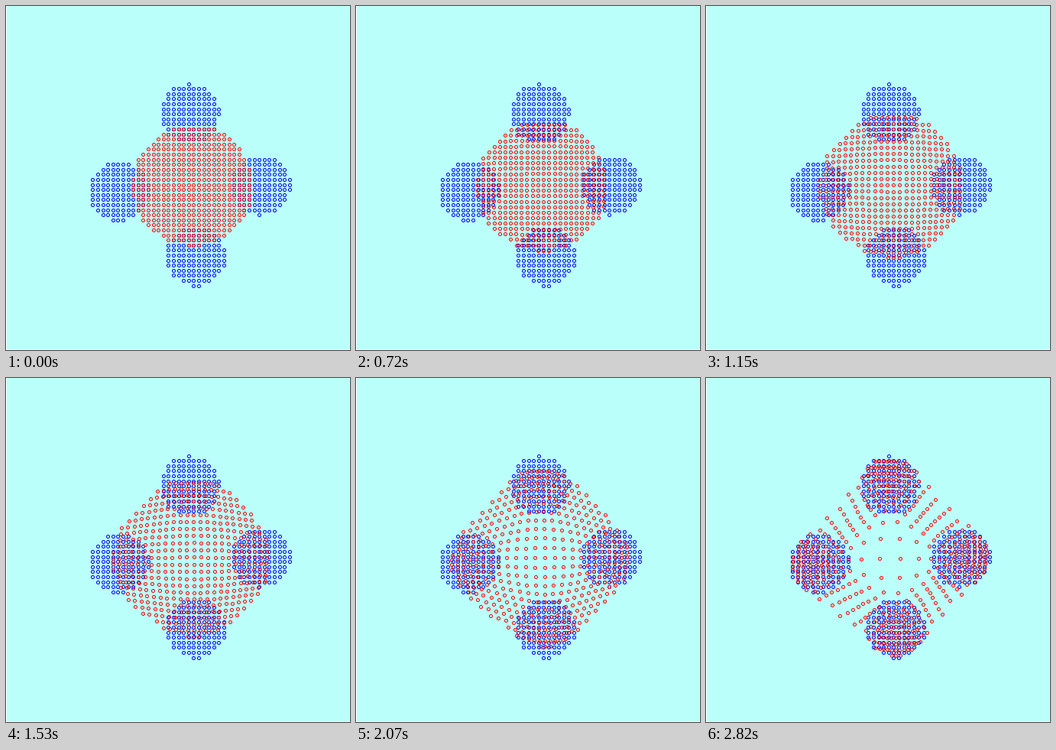
A matplotlib script that plays this animation: 450 px wide and 450 px high, repeating every 3.94 s.

```python
import numpy as np
import matplotlib.pyplot as plt
from matplotlib.animation import FuncAnimation
from matplotlib.patches import Rectangle

SIZE, DPI = 450, 100
LOOP, TICK = 3940, 20            # ms
START, STEP, STEPS = 560, 28.25, 81
GAP = 6.6                        # lattice spacing in pixels


def disc(cx, cy, r):
    """Lattice points inside a circle."""
    gx, gy = np.meshgrid(238.3 + GAP * np.arange(-22, 24),
                         101 + GAP * np.arange(-2, 44))
    inside = np.hypot(gx - cx, gy - cy) <= r
    return np.column_stack([gx[inside], gy[inside]])


def half_sq(a, b):
    return 0.5 * ((a[:, None, :] - b[None, :, :]) ** 2).sum(-1)


def log_mean(m):
    top = m.max(axis=1, keepdims=True)
    return top[:, 0] + np.log(np.exp(m - top).mean(axis=1))


def transport(x, y, eps=50.0):
    """Barycentric map of the entropic transport plan from x to y."""
    cost = half_sq(x, y)
    g = np.zeros(len(y))
    for e in np.append(np.geomspace(4000, eps, 80), np.full(60, eps)):
        f = -e * log_mean((g - cost) / e)
        g = -e * log_mean((f - cost.T) / e)
    m = (g - cost) / eps
    plan = np.exp(m - m.max(axis=1, keepdims=True))
    return plan @ y / plan.sum(axis=1, keepdims=True)


targets = np.vstack([disc(239.5, 140, 39.05), disc(147.5, 241.5, 39.05),
                     disc(332.5, 233.7, 39.05), disc(247.9, 326.5, 39.05)])
source = disc(243.3, 234, 78.8)

# Debiased displacement, so the rim of the disc reaches the rim of the targets
shift = transport(source, targets) - transport(source, source)
near = half_sq(source, source)


def place(step):
    """Flow that starts smooth and splits sharply toward the end."""
    u = step / STEPS
    sigma = 9 + 50 * (1 - u) ** 1.2
    k = np.exp(-near / sigma ** 2)
    smooth = k @ shift / k.sum(axis=1, keepdims=True)
    return source + u ** 0.45 * smooth


path = [place(s) for s in range(STEPS + 1)]

fig = plt.figure(figsize=(SIZE / DPI, SIZE / DPI), dpi=DPI, facecolor="white")
ax = fig.add_axes([0, 0, 1, 1])
ax.set_xlim(0, SIZE)
ax.set_ylim(SIZE, 0)
ax.axis("off")
ax.add_patch(Rectangle((1, 0), SIZE - 1, SIZE - 1, fc="#bafffa", lw=0,
                       antialiased=False))


def rings(pts, color):
    line, = ax.plot(pts[:, 0] + 0.5, pts[:, 1] + 0.5, "o", mfc="none",
                    mec=color, ms=4 * 72 / DPI, mew=72 / DPI,
                    antialiased=False)
    return line


rings(targets, "#0000ff")
dots = rings(source, "#ff0000")


def draw(i):
    t = i * TICK
    step = 0 if t < START else min(STEPS, int((t - START) / STEP) + 1)
    dots.set_data(path[step][:, 0] + 0.5, path[step][:, 1] + 0.5)
    return dots,


anim = FuncAnimation(fig, draw, frames=LOOP // TICK, interval=TICK,
                     repeat=True, repeat_delay=0, blit=False)
plt.show()
```
